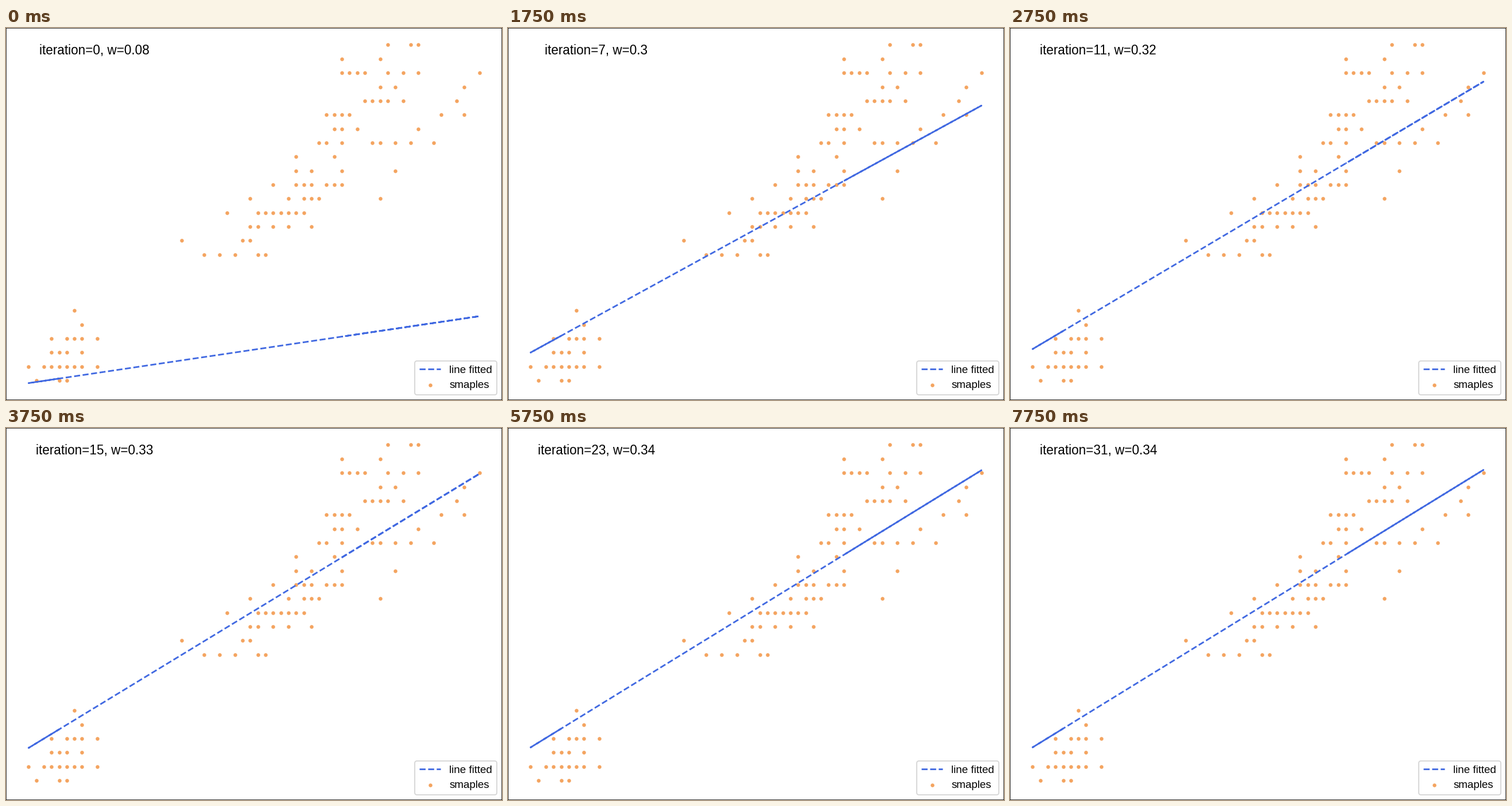
These frames come from a looping animation (864x648 px, 8000 ms). A matplotlib script:

```python
import matplotlib.pyplot as plt
from matplotlib.animation import FuncAnimation

plt.rcParams["font.family"] = "Liberation Sans"

FRAMES, INTERVAL = 32, 250
W_BEST = 0.3365      # least-squares slope through the origin
DECAY = 0.759        # error left after each descent step

# sample positions in tenths: height -> x values
ROWS = {
    25: [57, 60, 61],
    24: [51, 56],
    23: [51, 52, 53, 54, 57, 59, 61, 69],
    22: [56, 58, 67],
    21: [54, 55, 56, 57, 59, 66],
    20: [49, 50, 51, 52, 64, 67],
    19: [50, 51, 53, 61],
    18: [48, 49, 51, 55, 56, 58, 60, 63],
    17: [45, 50],
    16: [45, 47, 51, 58],
    15: [42, 45, 46, 47, 49, 50, 51],
    14: [39, 44, 46, 47, 48, 56],
    13: [36, *range(40, 47)],
    12: [39, 40, 42, 44, 47],
    11: [30, 38, 39],
    10: [33, 35, 37, 40, 41],
    6: [16],
    5: [17],
    4: [13, 15, 16, 17, 19],
    3: [13, 14, 15, 17],
    2: [10, *range(12, 18), 19],
    1: [11, 14, 15],
}
# The line doubles back at both ends, so its dashes overlap there.
LINE_X = [1.4, 1.0, 6.9, 5.1]


def slope(step):
    return W_BEST * (1 - DECAY ** (step + 1))


def padded(low, high):
    pad = 0.05 * (high - low)
    return low - pad, high + pad


fig = plt.figure(figsize=(6.4, 4.8), dpi=135)
ax = fig.add_axes([0, 0, 1, 1])
ax.set(xticks=[], yticks=[], xlim=padded(1.0, 6.9), ylim=padded(slope(0), 2.5))

points = [(x / 10, y / 10) for y, xs in ROWS.items() for x in xs]
line, = ax.plot([], [], "--", color="royalblue", lw=1.5, label="line fitted")
ax.scatter(*zip(*points), s=12, color="sandybrown", linewidths=0, label="smaples")
ax.legend(loc="lower right", fontsize=10)
caption = fig.text(0.178, 1 - 46 / 648, "", fontsize=12, ha="center", va="baseline")


def update(step):
    w = slope(step)
    line.set_data(LINE_X, [w * x for x in LINE_X])
    caption.set_text(f"iteration={step}, w={round(w, 2)}")
    return line, caption


anim = FuncAnimation(fig, update, frames=FRAMES, interval=INTERVAL,
                     repeat=True, repeat_delay=0)
plt.show()
```
